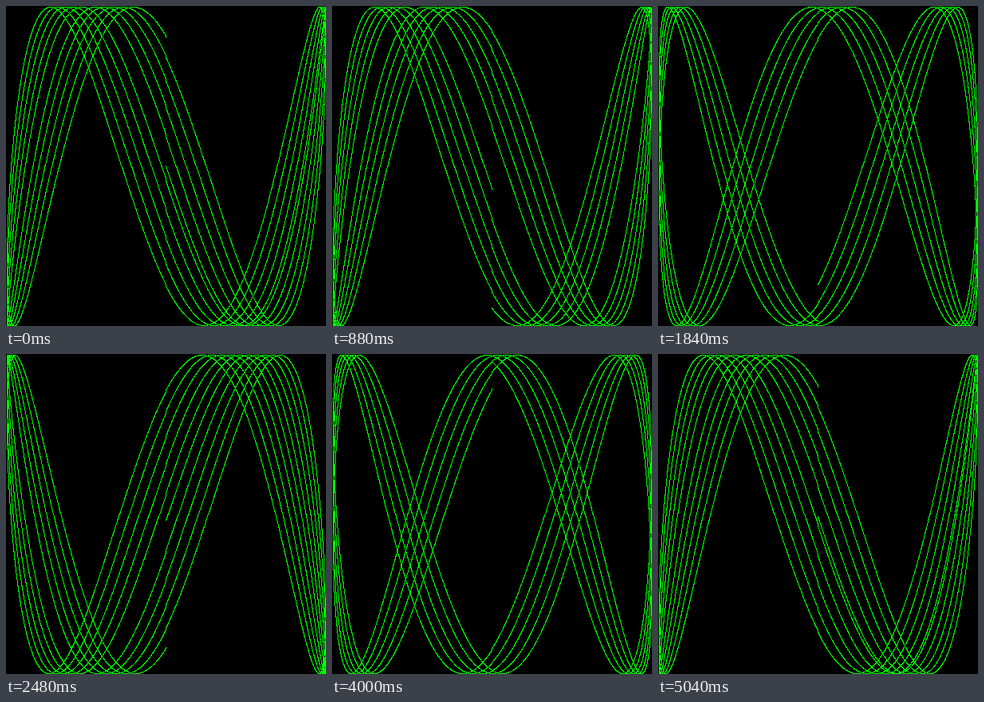
Animation, 401 px wide and 401 px high, one loop 5120 ms. Source, as an HTML page with a canvas:

```html
<!DOCTYPE html>
<html lang="en">
<head>
<meta charset="utf-8">
<title>Lissajous</title>
<style>
  html, body { margin: 0; width: 100%; height: 100%; overflow: hidden; background: #000; }
  canvas { display: block; width: 401px; height: 401px; image-rendering: pixelated; }
</style>
</head>
<body>
<canvas id="stage" width="401" height="401"></canvas>
<script>
const RADIUS = 200;
const SIDE = 2 * RADIUS + 1;
const SWEEPS = 5;
const STEP = 0.001;
const FREQ = 3 - 0.9455 / (SWEEPS * 2 * Math.PI);
const PHASE_STEP = 0.1;
const TICK = 80;
const TICKS = 64;

const ctx = document.getElementById("stage").getContext("2d");
const image = ctx.createImageData(SIDE, SIDE);
const pixels = new Uint32Array(image.data.buffer);
// Packed as ABGR
const BLACK = 0xff000000;
const GREEN = 0xff00ff00;

// Truncating toward zero gives the small jog along the centre lines
const plot = v => RADIUS + Math.trunc(v * RADIUS + 0.5);

function draw(phase) {
  pixels.fill(BLACK);
  for (let t = 0; t < SWEEPS * 2 * Math.PI; t += STEP) {
    const x = plot(Math.sin(t));
    const y = plot(Math.sin(t * FREQ + phase));
    pixels[y * SIDE + x] = GREEN;
  }
  ctx.putImageData(image, 0, 0);
}

const start = performance.now();
let shown = -1;

function update() {
  const elapsed = Math.max(0, performance.now() - start);
  const tick = Math.floor(elapsed / TICK) % TICKS;
  if (tick !== shown) {
    shown = tick;
    draw(tick * PHASE_STEP);
  }
  requestAnimationFrame(update);
}
update();
</script>
</body>
</html>
```
